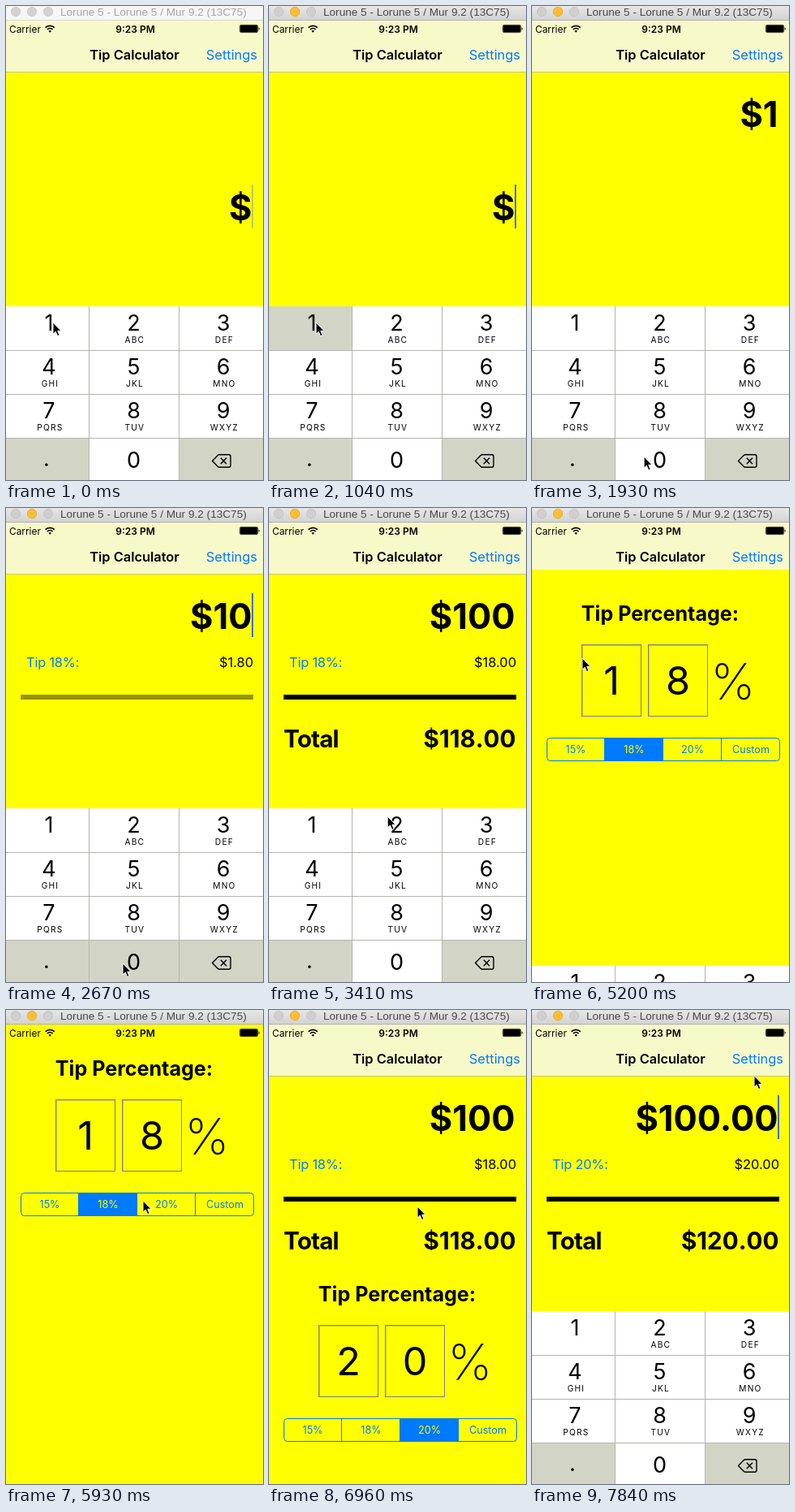
An HTML page for the animation above (7.99 s loop, 317 px wide and 584 px high).

```html
<!DOCTYPE html>
<html lang="en">
<head>
<meta charset="utf-8">
<title>Tip Calculator</title>
<style>
  html, body { margin: 0; width: 317px; height: 584px; overflow: hidden; background: #ff0; }
  svg { display: block; font-family: Inter, Roboto, sans-serif; }
  .mid { text-anchor: middle; }
  .end { text-anchor: end; }
  .body { font-size: 16.4px; }
  .blue { fill: #007aff; }
  .big { font-size: 43.4px; font-weight: 700; }
  .sum { font-size: 29.6px; font-weight: 700; }
  .digit { font-size: 27px; }
  .letters { font-size: 10.2px; letter-spacing: 1.2px; }
  .seg { font-size: 12.6px; }
  .cell { font-size: 48.5px; }
  #totalValue { font-kerning: none; font-feature-settings: "calt" 0; }
</style>
</head>
<body>
<svg width="317" height="584" viewBox="0 0 317 584">
  <defs>
    <linearGradient id="chrome" x2="0" y2="1">
      <stop stop-color="#e6e6e6"/><stop offset="1" stop-color="#d2d2d2"/>
    </linearGradient>
    <clipPath id="screen"><rect y="18" width="317" height="566"/></clipPath>
  </defs>
  <rect width="317" height="584" fill="#ff0"/>

  <g id="main">
    <rect y="18" width="317" height="63" fill="#f8f9c9"/>
    <rect y="81" width="317" height="1" fill="#c8c980"/>
    <text class="mid body" x="158.5" y="66" font-weight="600">Tip Calculator</text>
    <text class="end body blue" x="310" y="66">Settings</text>
    <g id="field">
      <text id="amount" class="end big" x="303.5" y="148.5"></text>
      <rect id="caret" x="303" y="105" width="2" height="54" fill="#426bf2"/>
    </g>
    <g id="tip">
      <text id="tipLabel" class="body blue" x="25" y="195.5" letter-spacing="-.2"></text>
      <text id="tipValue" class="end body" x="305" y="195.5"></text>
    </g>
    <rect id="rule" x="18" y="230" width="287" height="6"/>
    <g id="total">
      <text class="sum" x="18" y="294.5" letter-spacing="-.8">Total</text>
      <text id="totalValue" class="end sum" x="304.5" y="294.5"></text>
    </g>
  </g>

  <g clip-path="url(#screen)">
    <g id="settings">
      <rect y="18" width="317" height="566" fill="#ff0"/>
      <text class="mid" x="158" y="80.5" font-size="25.1" font-weight="700">Tip Percentage:</text>
      <g fill="none" stroke="#808086">
        <rect x="61.5" y="110.5" width="73" height="88"/>
        <rect x="143.5" y="110.5" width="73" height="88"/>
        <path d="M62.5 198V111.5H134M144.5 198V111.5H216" opacity=".4"/>
      </g>
      <text id="tens" class="mid cell" x="98" y="172"></text>
      <text id="ones" class="mid cell" x="180" y="172"></text>
      <text class="mid" x="248" y="178" font-size="62" font-weight="200">%</text>
      <g id="segments"></g>
    </g>
  </g>

  <g id="keyboard"></g>

  <g id="status">
    <text x="4" y="32.5" font-size="11.9">Carrier</text>
    <g fill="none" stroke="#000" stroke-width="1.7">
      <path d="M48.6 26.6a8 8 0 0 1 11.2 0M50.8 29a4.9 4.9 0 0 1 6.8 0"/>
    </g>
    <path d="M52.4 30.8a2.6 2.6 0 0 1 3.6 0L54.2 32.8z"/>
    <text class="mid" x="159.5" y="32.5" font-size="12" font-weight="600">9:23 PM</text>
    <rect x="288.4" y="23.4" width="22.2" height="9.2" rx="1.8" fill="none" stroke="#000" stroke-width=".8"/>
    <rect x="289.1" y="24.1" width="20.8" height="7.8" rx=".6"/>
    <path d="M311.6 26.2a2 2 0 0 1 0 3.6z"/>
  </g>

  <g id="window">
    <rect id="bar" width="317" height="18"/>
    <rect id="barEdge" y="17" width="317" height="1"/>
    <g id="lights" stroke-width=".7"></g>
    <text id="title" x="67" y="12" font-size="13.6" font-family="Liberation Sans, Arial, sans-serif">Lorune 5 - Lorune 5 / Mur 9.2 (13C75)</text>
  </g>

  <path id="pointer" d="M0 0V14.2L3.2 11.2 5.6 16.6 8 15.6 5.7 10.3H10z" stroke="#fff"/>
</svg>
<script>
const LOOP = 7990, STEP = LOOP / 54;
const SCREEN = 566, KEYS = 216;
const NS = 'http://www.w3.org/2000/svg';
const $ = id => document.getElementById(id);

function add(parent, tag, attrs, text) {
  const el = document.createElementNS(NS, tag);
  for (const k in attrs) el.setAttribute(k, attrs[k]);
  if (text) el.textContent = text;
  parent.appendChild(el);
  return el;
}
const set = (id, attrs) => { for (const k in attrs) $(id).setAttribute(k, attrs[k]); };
const write = (id, text) => { if ($(id).textContent !== text) $(id).textContent = text; };
const shiftDown = (id, y) => set(id, { transform: `translate(0 ${Math.round(y)})` });

// Keyboard
const keyFills = {};
function buildKeyboard() {
  const kb = $('keyboard');
  const edges = [0, 103, 213.5, 317], centers = [53, 157.5, 268];
  const labels = ['1', '2ABC', '3DEF', '4GHI', '5JKL', '6MNO', '7PQRS', '8TUV', '9WXYZ', '.', '0', ''];
  labels.forEach((label, i) => {
    const c = i % 3, y = 370 + 54 * Math.floor(i / 3), x = centers[c];
    const plain = label > '' && label !== '.';
    keyFills[label[0]] = add(kb, 'rect', {
      x: edges[c], y, width: edges[c + 1] - edges[c], height: 56, fill: plain ? '#fff' : '#d2d5c5'
    });
    if (label === '.') add(kb, 'text', { class: 'mid digit', x: 50, y: 567 }, '.');
    else if (plain) {
      add(kb, 'text', { class: 'mid digit', x, y: label === '0' ? 569 : y + 29.5 }, label[0]);
      add(kb, 'text', { class: 'mid letters', x: x + 1.4, y: y + 45 }, label.slice(1));
    }
  });
  add(kb, 'path', {
    d: 'M0 424.5H317M0 478.5H317M0 532.5H317M102.5 370V586M213.5 370V586',
    stroke: '#b4b5af', fill: 'none'
  });
  add(kb, 'path', {
    d: 'M254.5 560.5L261.3 553.4Q262 552.7 263 552.7H274.8Q277 552.7 277 554.9V566.1Q277 568.3 274.8 568.3H263Q262 568.3 261.3 567.6ZM264.8 556.8l7.2 7.4M272 556.8l-7.2 7.4',
    stroke: '#000', 'stroke-width': 1.4, 'stroke-linejoin': 'round', fill: 'none'
  });
}

// Segmented control
const segs = [];
function buildSegments() {
  const g = $('segments');
  ['15%', '18%', '20%', 'Custom'].forEach((name, i) => {
    const x = 18 + 72 * i;
    segs.push({
      fill: add(g, 'rect', { x: x - (i ? .5 : -.5), y: 225.5, width: 72, height: 28, fill: '#007aff' }),
      text: add(g, 'text', { class: 'mid seg', x: x + 36, y: 244 }, name)
    });
    if (i) add(g, 'path', { d: `M${x - .5} 225V254`, stroke: '#007aff' });
  });
  add(g, 'rect', { x: 18.5, y: 225.5, width: 287, height: 28, rx: 4, fill: 'none', stroke: '#007aff' });
}

// Motion
const clamp = v => Math.min(1, Math.max(0, v));
const smooth = v => v * v * (3 - 2 * v);
const ease = (t, from, to) => smooth(clamp((t - from) / (to - from)));
const within = (t, ...spans) => spans.some(([a, b]) => t >= a && t < b);
const at = (t, steps) => steps.filter(s => t >= s[0]).pop()[1];

// Critically damped system spring, 0 to 1
function spring(t, start) {
  const x = Math.max(0, t - start) / 1000 * Math.sqrt(1000 / 3);
  return 1 - (1 + x) * Math.exp(-x);
}

const route = [
  [0, 58, 390], [1180, 58, 390], [1900, 138, 555], [2220, 144, 561], [3100, 144, 561],
  [3840, 150, 66], [4290, 60, 174], [4440, 60, 174], [4590, 62, 185], [5320, 62, 185],
  [5910, 169, 235], [6350, 183, 242], [7390, 183, 242], [7840, 274, 81], [LOOP, 274, 81]
];
function pointerAt(t) {
  const i = Math.max(1, route.findIndex(p => p[0] > t));
  const a = route[i - 1], b = route[i], p = ease(t, a[0], b[0]);
  return [a[1] + (b[1] - a[1]) * p, a[2] + (b[2] - a[2]) * p];
}

function paintWindow(active) {
  set('bar', { fill: active ? 'url(#chrome)' : '#f6f6f6' });
  set('barEdge', { fill: active ? '#b2b2b2' : '#d6d6d6' });
  set('title', { fill: active ? '#484848' : '#a6a6a6' });
  [...$('lights').children].forEach((c, i) => {
    const lit = active && i === 1;
    c.setAttribute('fill', lit ? '#fdbe30' : active ? '#cfcfcf' : '#d2d2d2');
    c.setAttribute('stroke', lit ? '#dfa023' : active ? '#bdbdbd' : '#c6c6c6');
  });
}

function draw(t) {
  paintWindow(t >= 880);

  const bill = at(t, [[0, 0], [1180, 1], [2220, 10], [2800, 100]]);
  const done = t >= 7380;
  const rate = done ? 20 : 18;
  write('amount', '$' + (done ? bill.toFixed(2) : bill || ''));
  write('tipLabel', `Tip ${rate}%:`);
  write('tipValue', '$' + (bill * rate / 100).toFixed(2));
  write('totalValue', '$' + (bill * (1 + rate / 100)).toFixed(2));

  shiftDown('field', 115 * (1 - ease(t, 1180, 1900)));
  const on = within(t, [590, 1620], [2200, 3390], [3830, 4280], [7500, LOOP]);
  const fading = within(t, [0, 140], [440, 580]);
  set('caret', { opacity: on ? 1 : fading ? .35 : 0 });
  set('tip', { opacity: ease(t, 1940, 2440) });
  set('tipLabel', { opacity: within(t, [4720, 4960]) ? .25 : 1 });
  set('rule', { opacity: ease(t, 2440, 2940) });
  set('total', { opacity: ease(t, 2940, 3440) });

  const shown = t < 6864 ? spring(t, 4967) : 1 - spring(t, 6864);
  shiftDown('settings', SCREEN * (1 - shown));
  set('settings', { visibility: within(t, [4967, 7380]) ? 'visible' : 'hidden' });
  const picked = t >= 6400 ? 2 : 1;
  write('tens', picked === 2 ? '2' : '1');
  write('ones', picked === 2 ? '0' : '8');
  segs.forEach((s, i) => {
    s.fill.setAttribute('opacity', i === picked ? 1 : 0);
    s.text.setAttribute('fill', i === picked ? '#ff0' : '#007aff');
  });

  const hidden = t < 7000 ? spring(t, 4967) : 1 - spring(t, 7440);
  shiftDown('keyboard', KEYS * hidden);
  const press = (key, down) => keyFills[key].setAttribute('fill', down ? '#d2d5c5' : '#fff');
  press('1', within(t, [880, 1180]));
  press('0', within(t, [2060, 2300], [2600, 2800]));

  set('pointer', { transform: `translate(${pointerAt(t)})` });
}

buildKeyboard();
buildSegments();
for (const cx of [12, 32, 52]) add($('lights'), 'circle', { cx, cy: 7, r: 5.7 });

const start = performance.now();
function tick() {
  const t = (performance.now() - start) % LOOP;
  draw(Math.min(53, Math.floor((t + 4) / STEP)) * STEP);
  requestAnimationFrame(tick);
}
tick();
</script>
</body>
</html>
```
